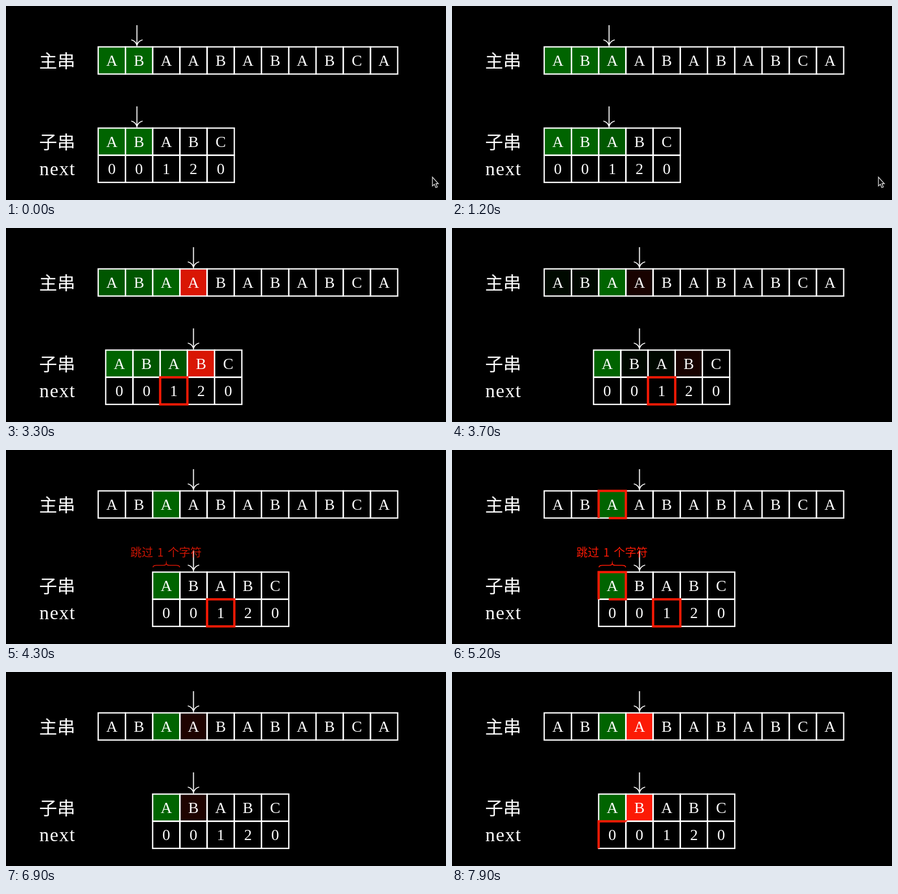
These frames come from a looping animation (778 px wide and 344 px high, 8000 ms). An HTML page with a canvas:

```html
<!DOCTYPE html>
<html lang="zh-CN">
<head>
<meta charset="utf-8">
<style>
html, body { margin: 0; background: #000; overflow: hidden; }
canvas { display: block; }
</style>
</head>
<body>
<canvas id="stage" width="778" height="344"></canvas>
<script>
const ctx = document.getElementById('stage').getContext('2d');
const LOOP = 8000, CELL = 48.14, LEFT = 163, MAIN_Y = 72.5, SUB_Y = 216.5;
const GREEN = '#006400', RED = '#fc1a05', WHITE = '#fff';
const SERIF = '"Liberation Serif", serif';
const HAN = '"Noto Sans CJK SC", "Noto Sans CJK JP", "Noto Sans CJK", sans-serif';

const sigmoid = x => 1 / (1 + Math.exp(-x));
const EDGE = sigmoid(-5);

// Sigmoid ease from 0 to 1 between start and start + duration
function ease(t, start, duration) {
  const u = Math.min(1, Math.max(0, (t - start) / duration));
  return Math.min(1, Math.max(0, (sigmoid(10 * (u - 0.5)) - EDGE) / (1 - 2 * EDGE)));
}

function text(str, x, y, font, color = WHITE, align = 'center') {
  ctx.font = font;
  ctx.fillStyle = color;
  ctx.textAlign = align;
  ctx.fillText(str, x, y);
}

function stroke(path, color, width) {
  ctx.strokeStyle = color;
  ctx.lineWidth = width;
  ctx.stroke(new Path2D(path));
}

function fillCell(x, y, color, alpha) {
  ctx.globalAlpha = alpha;
  ctx.fillStyle = color;
  ctx.fillRect(x, y, CELL, CELL);
  ctx.globalAlpha = 1;
}

function row(str, x, y) {
  [...str].forEach((char, i) => {
    ctx.strokeStyle = WHITE;
    ctx.lineWidth = 2.3;
    ctx.strokeRect(x + i * CELL, y, CELL, CELL);
    text(char, x + (i + 0.5) * CELL, y + 33.5, '27.5px ' + SERIF);
  });
}

function arrow(x, y) {
  ctx.save();
  ctx.translate(x, y);
  stroke('M0 0V35M-10 26Q-2 28 0 36Q2 28 10 26', WHITE, 1.8);
  ctx.restore();
}

// Square outline traced clockwise from its bottom left corner
function frame(x, y, progress, alpha) {
  if (!progress || !alpha) return;
  ctx.save();
  ctx.globalAlpha = alpha;
  if (progress < 1) ctx.setLineDash([4 * CELL * progress, 4 * CELL]);
  stroke(`M${x} ${y + CELL}v${-CELL}h${CELL}v${CELL}z`, RED, 4);
  ctx.restore();
}

function note(alpha) {
  ctx.save();
  ctx.globalAlpha = alpha;
  ctx.wordSpacing = '3px';
  text('跳过 1 个字符', 220, 188.5, '20px ' + HAN, RED, 'left');
  stroke('M260 208Q260 204.5 266 204.5H278Q283 204.5 283.4 201Q284 204.5 289 204.5H301Q307 204.5 307 208', RED, 1.6);
  ctx.restore();
}

function cursor() {
  const shape = new Path2D('M754 303.5V319L757.5 316L760 322L762.7 321L760.2 315H764.5Z');
  ctx.fillStyle = '#000';
  ctx.fill(shape);
  ctx.strokeStyle = '#ddd';
  ctx.lineWidth = 1.3;
  ctx.stroke(shape);
}

function draw(t) {
  const step1 = ease(t, 850, 500), step2 = ease(t, 1350, 500);
  const slide = ease(t, 2980, 1000), kept = 1 - slide;
  const shown = 1 - ease(t, 5950, 500);
  const mismatch = ease(t, 6750, 500);
  const subX = LEFT + 2 * CELL * slide;
  const mainCell = i => LEFT + i * CELL, subCell = i => subX + i * CELL;

  ctx.fillStyle = '#000';
  ctx.fillRect(0, 0, 778, 344);

  fillCell(mainCell(0), MAIN_Y, GREEN, kept);
  fillCell(mainCell(1), MAIN_Y, GREEN, kept);
  fillCell(mainCell(2), MAIN_Y, GREEN, step1);
  fillCell(mainCell(3), MAIN_Y, RED, Math.max(step2 * kept, mismatch));
  fillCell(subCell(0), SUB_Y, GREEN, 1);
  fillCell(subCell(1), SUB_Y, GREEN, kept);
  fillCell(subCell(2), SUB_Y, GREEN, step1 * kept);
  fillCell(subCell(3), SUB_Y, RED, step2 * kept);
  fillCell(subCell(1), SUB_Y, RED, mismatch);

  row('ABAABABABCA', LEFT, MAIN_Y);
  row('ABABC', subX, SUB_Y);
  row('00120', subX, SUB_Y + CELL);

  text('主串', 90.5, 109, '32px ' + HAN);
  text('子串', 90.5, 253, '32px ' + HAN);
  ctx.letterSpacing = '1.4px';
  text('next', 59, 300, '34px ' + SERIF, WHITE, 'left');
  ctx.letterSpacing = '0px';

  const arrowX = 231.5 + 52 * step1 + 48 * step2;
  arrow(arrowX, 34);
  arrow(arrowX, 178);

  const match = ease(t, 4480, 1000);
  frame(subCell(2), SUB_Y + CELL, ease(t, 1980, 1000), shown);
  frame(mainCell(2), MAIN_Y, match, shown);
  frame(subCell(0), SUB_Y, match, shown);
  frame(subCell(0), SUB_Y + CELL, ease(t, 7400, 1000), 1);
  note(ease(t, 3980, 500) * shown);

  if (t < 2300) cursor();
}

const begin = performance.now();
function tick() {
  draw((performance.now() - begin) % LOOP);
  requestAnimationFrame(tick);
}
tick();
</script>
</body>
</html>
```
